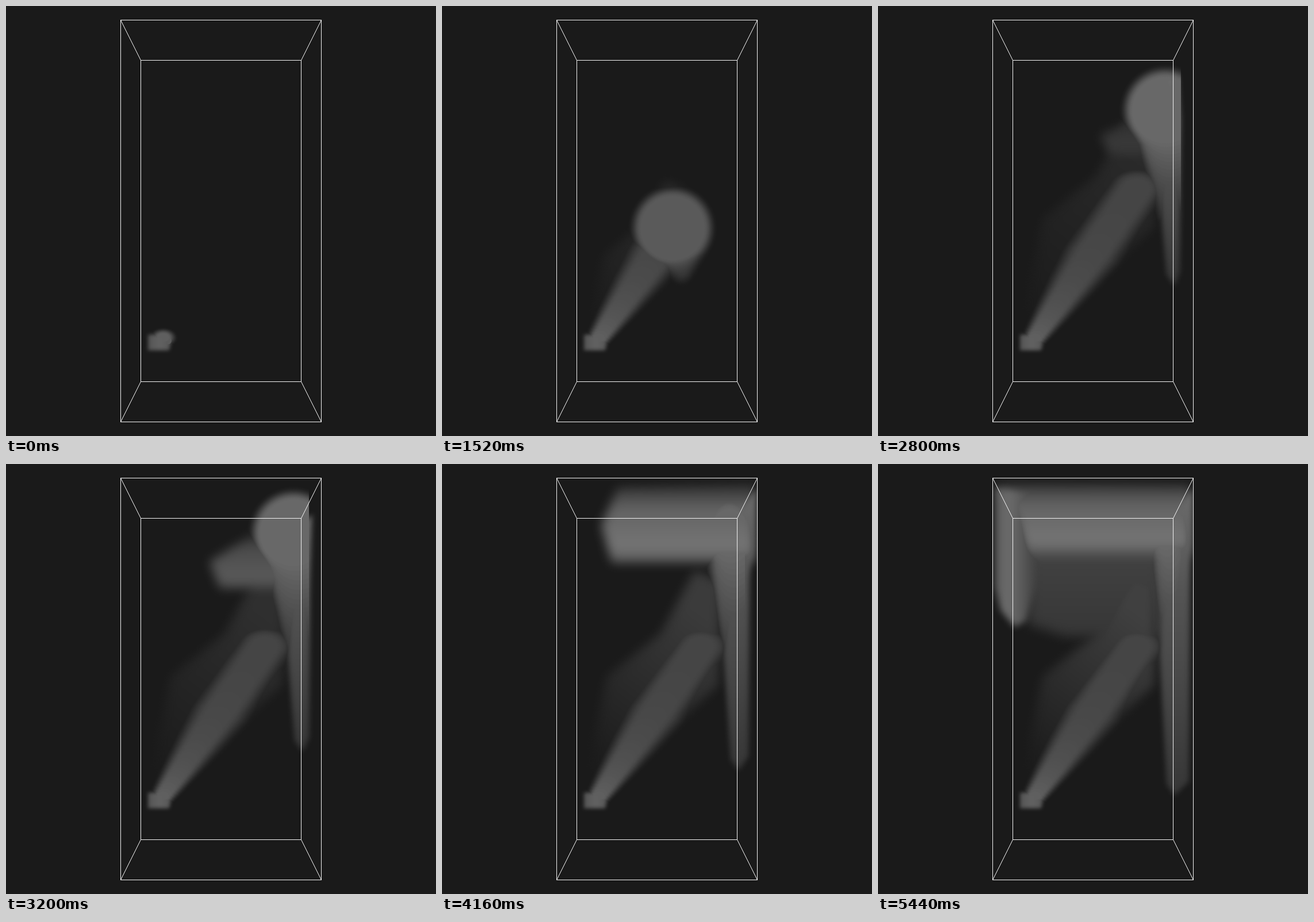
An HTML page with a canvas that plays this animation: 748 by 748 pixels, repeating every 5520 ms.

```html
<!DOCTYPE html>
<html lang="en">
<head>
<meta charset="utf-8">
<title>Smoke in a box</title>
<style>
  html, body { margin: 0; width: 100%; height: 100%; overflow: hidden; background: #1a1a1a; }
  canvas { display: block; width: 100%; height: 100%; }
</style>
</head>
<body>
<canvas id="stage" width="748" height="748"></canvas>
<script>
const LOOP = 5520, STEP = 80, AIR = 26;
const BASE = { x: 268, y: 585 };
const ctx = document.getElementById('stage').getContext('2d');

const grey = g => `rgb(${g}, ${g}, ${g})`;
const mix = (a, b, u) => a + (b - a) * u;
const ramp = (t, from, to) => Math.min(1, Math.max(0, (t - from) / (to - from)));
const ease = u => u * u * (3 - 2 * u);

function addStops(gradient, greys) {
  greys.forEach((g, i) => gradient.addColorStop(i / (greys.length - 1), grey(g)));
  return gradient;
}

// Round soft cloud: flat inside the core, fading into the air.
function puff(x, y, rx, ry, g, core) {
  const fill = ctx.createRadialGradient(0, 0, 0, 0, 0, 1);
  for (let i = 0; i <= 6; i++) {
    fill.addColorStop(mix(core, 1, i / 6), grey(mix(g, AIR, ease(i / 6))));
  }
  ctx.save();
  ctx.translate(x, y);
  ctx.scale(rx, ry);
  ctx.fillStyle = fill;
  ctx.fillRect(-1, -1, 2, 2);
  ctx.restore();
}

// Blurred polygon shaded along a line.
function slab(points, blur, line, greys) {
  ctx.filter = `blur(${blur}px)`;
  ctx.fillStyle = addStops(ctx.createLinearGradient(...line), greys);
  ctx.beginPath();
  points.forEach(p => ctx.lineTo(...p));
  ctx.fill();
  ctx.filter = 'none';
}

function clipTo(x, y, w, h) {
  ctx.beginPath();
  ctx.rect(x, y, w, h);
  ctx.clip();
}

const stemHeight = t => Math.min(270, 10 + 0.118 * t);

// Thin veil around the stem, growing out of the nozzle.
function drawHaze(t) {
  const k = stemHeight(t) / 270;
  const at = (x, y) => [BASE.x + x * k, BASE.y + y * k];
  const far = mix(AIR, mix(42, 64, ramp(t, 2800, 4560)), ramp(t, 600, 1500));
  slab([at(-14, -60), at(18, -215), at(112, -290), at(172, -400), at(218, -380),
    at(212, -200), at(90, -90), at(30, -20)], 9,
    [...at(-10, -80), ...at(175, -330)], [28, far]);
}

// Straight widening cone.
function drawStem(t) {
  for (let h = 8; h <= stemHeight(t); h += 5) {
    const rx = Math.min(62, 24 + 0.25 * h);
    const g = 68 + 30 * Math.exp(-h / 70);
    puff(BASE.x + 0.68 * h, BASE.y - h, rx, rx * 0.7, g, 0.35);
  }
}

// Rising cap with a narrowing, dimming skirt below it.
function drawCap(t) {
  const x = Math.min(500, 281 + 0.079 * t);
  const y = Math.max(120, 582 - 0.165 * t * t / (t + 430));
  const r = 8 + 66 * (1 - Math.exp(-t / 500));
  const late = ramp(t, 3600, 4560);
  const skirt = Math.min(230, Math.max(0, 0.09 * (t - 800)));
  const top = mix(90, 104, ramp(t, 1500, 2800));
  for (let q = 0; q <= 1; q += 0.05) {
    const rx = r * (1 - 0.65 * q) * (1 - 0.35 * late);
    puff(Math.min(508, x + 0.25 * skirt * q), y + skirt * q,
      rx * 1.1, r * 1.1 * (1 - 0.5 * q), mix(top, 54, q), mix(0.7, 0.35, Math.max(q, late)));
  }
}

// Smoke rolling left under the ceiling.
function drawRoof(t) {
  if (t < 2240) return;
  const u = ease(ramp(t, 2700, 3700)), full = ramp(t, 4560, 5440);
  const front = Math.max(240, 386 - 0.08 * (t - 2800));
  const corner = mix(75, 5, ramp(t, 3500, 4500));
  const top = mix(195, mix(50, 34, ramp(t, 3600, 4560)), u);
  const bottom = mix(262, mix(172, 160, full), u);
  const right = mix(475, 545, u);
  const glow = ease(ramp(t, 2240, 3500));
  const lit = g => mix(AIR, g, mix(0.4, 1, u) * Math.min(1, glow * 2));
  slab([[front, (top + bottom) / 2], [mix(front + corner, 204, full), top],
    [right, mix(145, 36, u)], [right, bottom], [front + 18, bottom]], 9,
    [0, top, 0, bottom + 8], [lit(54), lit(96), lit(108), lit(116), lit(76)]);
}

function drawUnderRoof(t) {
  const u = ramp(t, 4560, 5440);
  const low = mix(180, 300, u);
  slab([[260, 145], [495, 145], [495, low], [325, low], [260, low - 22]], 10,
    [0, 150, 0, low], [mix(AIR, 66, u), mix(AIR, 54, u)]);
}

// Smoke pressed down along the right side.
function drawRightWall(t) {
  const on = ramp(t, 1900, 2700), u = ease(ramp(t, 2800, 3700));
  if (!on) return;
  const age = t - 2800, low = 487 + 0.034 * age, edge = 527 + 0.006 * age;
  const top = mix(120, 42, u);
  slab([[495, 120], [mix(522, 547, u), top], [edge, 200], [edge - 2, low - 25],
    [516, low], [502, low - 20], [490, 330]], 5,
    [0, top, 0, low], [108, 84, 70, 54].map(g => mix(AIR, g, on)));
}

function drawLeftWall(t) {
  const on = ramp(t, 4320, 4560), u = ramp(t, 4560, 5440);
  if (!on) return;
  const left = mix(243, 203, u), low = mix(200, 284, u);
  slab([[left, 40], [290, 60], [mix(310, 275, u), low - 75], [mix(300, 258, u), low - 12],
    [mix(255, 238, u), low], [left + 10, low - 30], [left, low - 70]], 6,
    [left, 0, 292, 0], [88, 108, 92, 70, 54].map(g => mix(AIR, g, on)));
}

function drawNozzle() {
  slab([[247, 572], [283, 569], [288, 580], [284, 599], [247, 599]], 3,
    [246, 0, 290, 0], [84, 98, 84]);
}

function drawBox() {
  const mid = 374, outer = [174.5, 349.5], inner = [139.5, 279.5];
  ctx.strokeStyle = '#f2f2f2';
  ctx.lineWidth = 1;
  for (const [w, h] of [outer, inner]) ctx.strokeRect(mid - w, mid - h, 2 * w, 2 * h);
  ctx.beginPath();
  for (const sx of [-1, 1]) for (const sy of [-1, 1]) {
    ctx.moveTo(mid + sx * outer[0], mid + sy * outer[1]);
    ctx.lineTo(mid + sx * inner[0], mid + sy * inner[1]);
  }
  ctx.stroke();
}

function draw(t) {
  ctx.fillStyle = grey(AIR);
  ctx.fillRect(0, 0, 748, 748);
  ctx.save();
  clipTo(199, 24, 350, 700);
  ctx.globalCompositeOperation = 'lighten';
  for (const part of [drawHaze, drawUnderRoof, drawRoof, drawRightWall, drawLeftWall, drawNozzle]) part(t);
  clipTo(199, 24, 328, 700);
  drawCap(t);
  drawStem(t);
  ctx.restore();
  drawBox();
}

const start = performance.now();
let shown = -1;
function tick() {
  const t = Math.floor((performance.now() - start) % LOOP / STEP) * STEP;
  if (t !== shown) draw(shown = t);
  requestAnimationFrame(tick);
}
tick();
</script>
</body>
</html>
```
